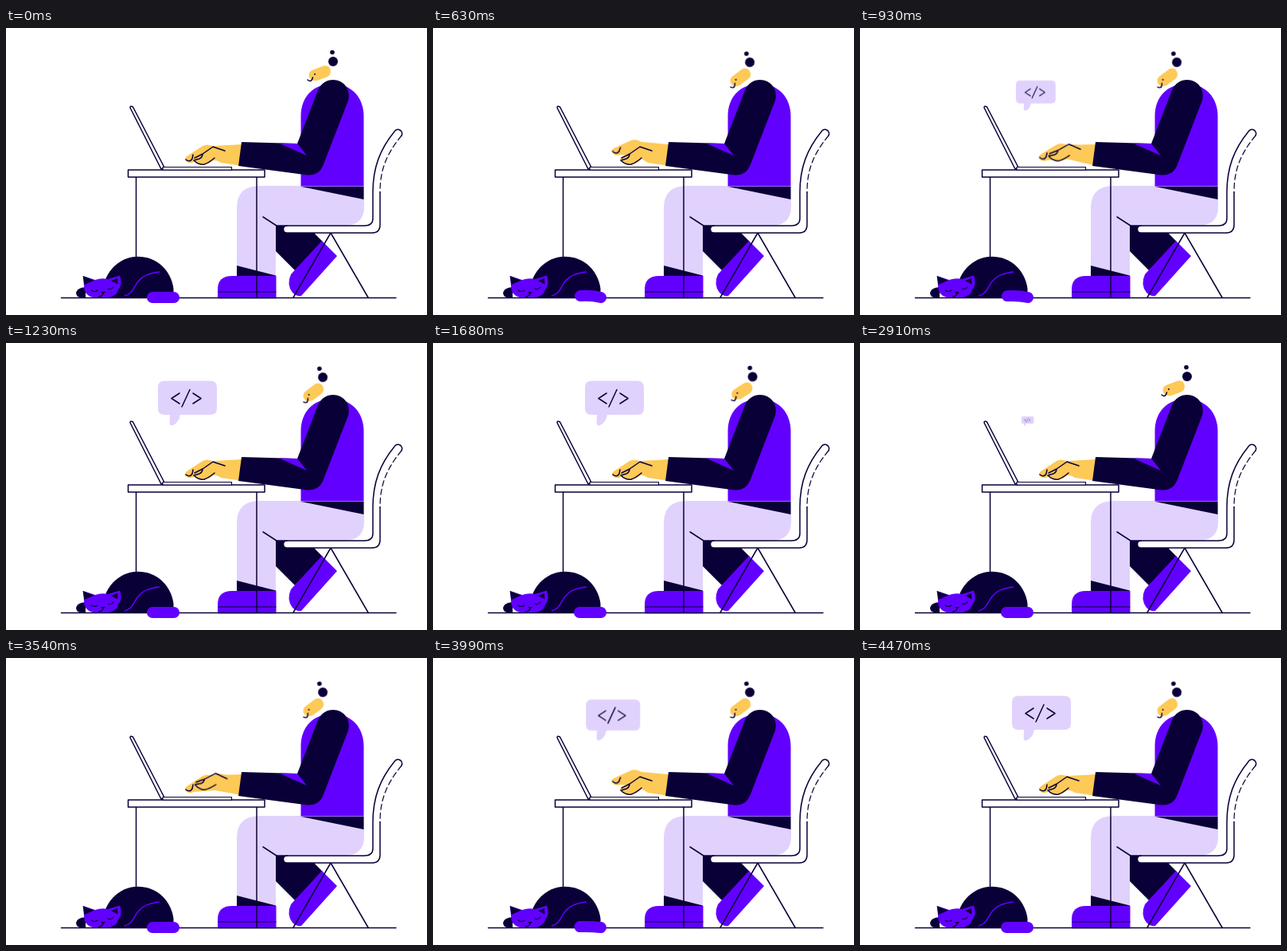
These frames come from a looping animation (529x360 px, 4500 ms). An HTML page:

```html
<!DOCTYPE html>
<html lang="en">
<head>
<meta charset="utf-8">
<title>Coding at a desk</title>
<style>
  :root { --ink: #0a0038; --violet: #6200ff; --lilac: #e0d2fd; --skin: #fdc957; }
  html, body { margin: 0; width: 100%; height: 100%; overflow: hidden; background: #fff; }
  svg { display: block; width: 529px; height: 360px; }
  .ink { fill: var(--ink); }
  .violet { fill: var(--violet); }
  .lilac { fill: var(--lilac); }
  .skin { fill: var(--skin); }
  .white { fill: #fff; }
  .line { stroke: var(--ink); stroke-width: 1.5; stroke-linecap: round; stroke-linejoin: round; }
  .open { fill: none; }
  .thin { stroke-width: 1.2; }

  .head, .bubble, .near, .far, .tail { animation: 4.5s ease-in-out infinite; }
  .head { transform-origin: 408px 87px; animation-name: nod; }
  .bubble { transform-origin: 206px 104px; animation-name: pop; }
  .near { transform-origin: 296px 158px; animation-name: tapNear; }
  .far { transform-origin: 296px 158px; animation-name: tapFar; }
  .tail { fill: none; stroke: var(--violet); stroke-width: 14; stroke-linecap: round; animation-name: flick; }

  /* The 3 s action plays one and a half times, then cuts back. */
  @keyframes nod {
    0%, 44.44%, 66.67% { transform: rotate(0deg); }
    11.11%, 33.33%, 77.78%, 100% { transform: rotate(-16.5deg); }
  }
  @keyframes pop {
    0%, 16.67%, 66.67%, 83.33% { transform: scale(0); }
    23.33%, 60.4%, 90%, 100% { transform: scale(1); }
  }
  @keyframes tapNear {
    0%, 8%, 14%, 18%, 22%, 74.67%, 80.67%, 84.67%, 88.67%, 100% { transform: none; }
    12%, 16%, 20%, 78.67%, 82.67%, 86.67% { transform: translate(2px, 0) rotate(7deg); }
  }
  @keyframes tapFar {
    0%, 12%, 16%, 20%, 24%, 78.67%, 82.67%, 86.67%, 90.67%, 100% { transform: none; }
    14%, 18%, 22%, 80.67%, 84.67%, 88.67% { transform: rotate(8.5deg); }
  }
  @keyframes flick {
    0%, 12%, 24%, 78.67%, 90.67%, 100% { d: path("M184 338Q197 338 211 338"); }
    14%, 20%, 80.67%, 86.67% { d: path("M185 336Q199 335 211 338"); }
  }
</style>
</head>
<body>
<svg viewBox="0 0 529 360">
  <path class="line open" d="M69.5 338.5H490"/>

  <!-- far leg -->
  <path class="ink" d="M339 248H388V258L398 268L363 304L339 280Z"/>
  <path class="violet" d="M397 267L416 286L371 336Q365 337 360 332Q352 322 358 309Z"/>

  <!-- near leg -->
  <path class="lilac" d="M290 311V226Q290 198 319 198H450V224Q450 248 424 248H339V311Z"/>
  <path class="ink" d="M290 298L339 310.500V311H290Z"/>
  <path class="violet" d="M266 338.500V328Q266 311 284 311H339.500V338.500Z"/>
  <path class="line open thin" d="M267 331H339"/>
  <path class="line open" d="M323 237L340 248M267 338.500H339"/>

  <!-- chair -->
  <path class="line open" d="M408 257L361 338M408 257L455 338"/>
  <path class="white" d="M353 248H450Q461 248 461 239V206C461 175 470 152 488 130A5 5 0 0 1 497 135C478 158 470 178 470 206V247Q470 257 460 257H353A4.500 4.500 0 0 1 353 248Z"/>
  <path class="line open" d="M470 206V247Q470 257 460 257H353A4.500 4.500 0 0 1 353 248H450Q461 248 461 239V206C461 175 470 152 488 130A5 5 0 0 1 497 135"/>
  <path class="line open thin" stroke-dasharray="7 4" d="M497 135C478 158 470 178 470 206"/>
  <path class="line open" d="M340 248H353"/>

  <!-- torso -->
  <path class="violet" d="M370.500 198.500V110C370.500 86 387 70 410 70C434 70 449.500 87 449.500 111V198.500Z"/>
  <path class="ink" d="M371 199H449.500V215Z"/>

  <!-- table and laptop -->
  <path class="line open" d="M163.500 187V300M315 187V338"/>
  <path class="line white" d="M153.500 178H325V187H153.500Z"/>
  <path class="line white" d="M156 100Q156 97 159.500 99L199 175L195 177Z"/>
  <path class="line white thin" d="M197 174.500H283.500V178H197Z"/>

  <!-- hands -->
  <g class="far">
    <path class="skin" d="M297 146L260 148Q252 145 247 148L227 161Q223 165 226 167Q230 171 236 168L262 166L297 172Z"/>
    <path class="line open" d="M226 165Q231 169 234 164L235 159"/>
  </g>
  <g class="near">
    <path class="skin" d="M297 146L276 149L260 149L247 158L237 162Q233 165 237 168Q243 173 250 171.500Q257 170 262 164L270 169L297 173Z"/>
    <path class="line open" d="M275 154L260 149L247 158L237 163M236 166Q242 172 249 171Q255 169 262 163M236 166L243 164Q247 162 247 158"/>
  </g>

  <!-- arm -->
  <path class="ink" d="M296 143L366 145L392 78C396 69 403 65 411 65C424 65 434 77 430 91L399 171Q394 185 379 184.500L292 173Z"/>
  <path class="violet" d="M343 144.500L366 145L378 160Z"/>

  <!-- head -->
  <g class="head">
    <circle class="ink" cx="411" cy="42" r="6"/>
    <circle class="ink" cx="410" cy="30.500" r="2.800"/>
    <path class="skin" d="M380.500 60Q380 54 387 52L399 47.500Q407 46 408 54Q408 60 402 62L391 66Q382 67 380.500 60Z"/>
    <circle class="ink" cx="388" cy="58" r="1"/>
    <path class="line open" d="M379 65Q384 69 385.500 62"/>
  </g>

  <!-- cat -->
  <path class="ink" d="M122 338.500A44.500 46 0 0 1 210.500 327V338.500Z"/>
  <path class="ink" d="M88 332Q89 326 100 325V338.500H94Q88 337 88 332Z"/>
  <path class="violet" d="M97 311L112 316Q120 313 128 315L143 310.500Q147 322 141 328Q139 338 124 338H109Q98 335 98 324Z"/>
  <path class="ink" d="M96.500 311L111 316.500L98.500 322ZM132 317L140 314L140.500 321.500Z"/>
  <path class="ink" d="M119 331H125L122 334Z"/>
  <path class="line open thin" d="M107 329Q111 332 115 329M128 327Q132 329 135 325M122 333Q121 337 116 337"/>
  <path class="open" stroke="#6200ff" stroke-width="1.500" d="M149 336C160 333 160 325 166 318C172 310 182 307 193 306"/>
  <path class="tail" d="M184 338Q197 338 211 338"/>

  <!-- speech bubble -->
  <g class="bubble">
    <path class="lilac" d="M199 47.500H257Q265 47.500 265 55.500V82Q265 90 257 90H219Q217 100 210 103Q206 105 205.500 100L206 90H199Q191 90 191 82V55.500Q191 47.500 199 47.500Z"/>
    <path class="line open" stroke-linecap="butt" d="M218 63L208 69.500L218 76M231 58.500L221 80M235 63L245 69.500L235 76"/>
  </g>
</svg>
</body>
</html>
```
